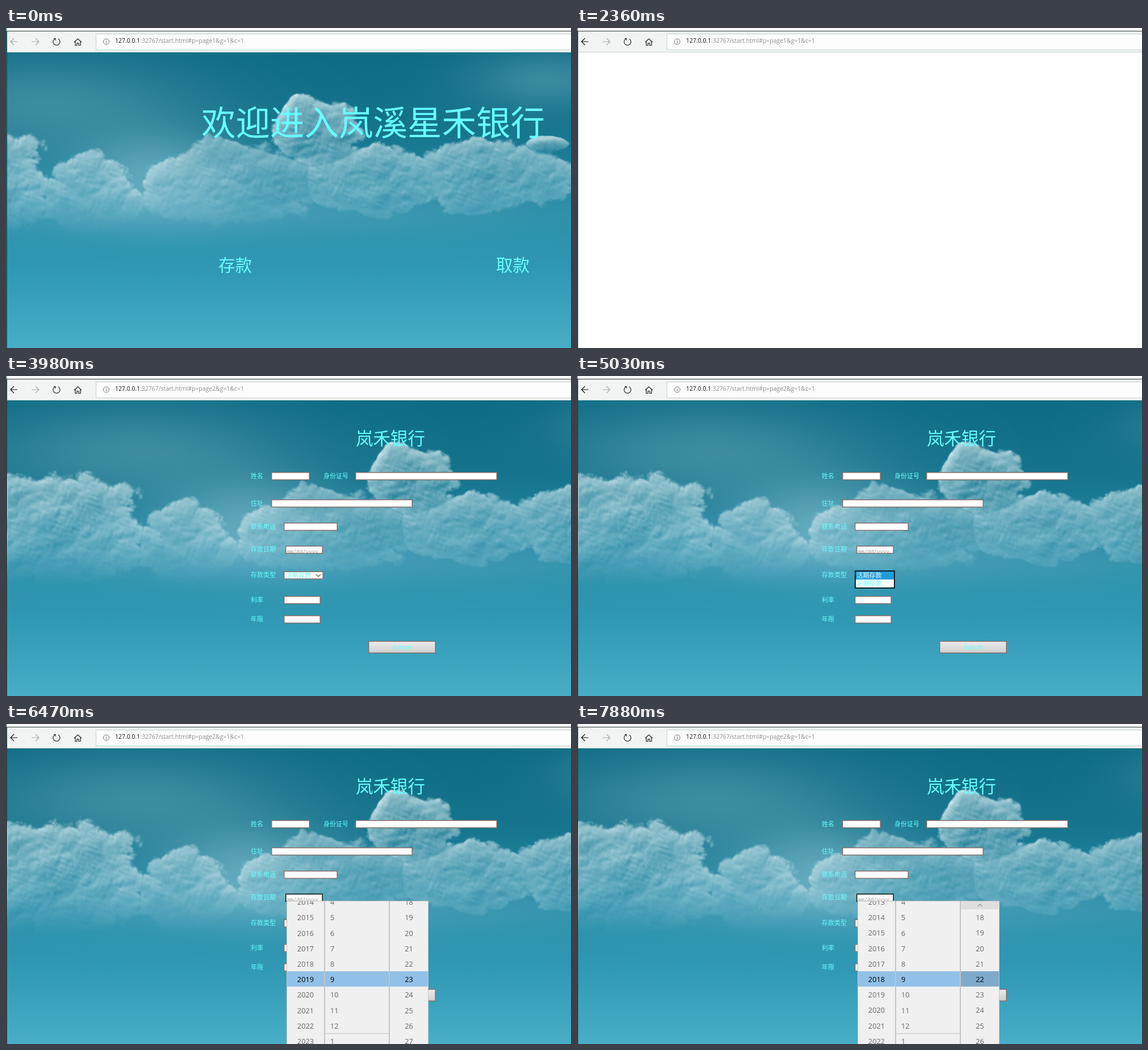
An HTML page with a canvas that plays this animation: 995x563 px, repeating every 8000 ms.

```html
<!DOCTYPE html>
<html lang="zh-CN">
<head>
<meta charset="utf-8">
<title>Bank prototype</title>
<style>
  html, body { margin: 0; width: 100%; height: 100%; overflow: hidden; background: #fff; }
  #stage { position: relative; width: 995px; height: 563px; overflow: hidden; background: #fefefe; }
  #sky { position: absolute; top: 0; }
  #ui { position: absolute; left: 0; top: 0; }
  text { white-space: pre; }
  .cjk { font-family: "Noto Sans CJK SC", "Noto Sans CJK", sans-serif; font-weight: 300; fill: #6ff; }
  .label { font-size: 11px; font-weight: 500; }
  .latin { font-family: "Open Sans", "Noto Sans", sans-serif; }
  .icon { fill: none; stroke: #222; stroke-width: 1.2; }
  .field { fill: #fff; stroke: #806e6a; stroke-width: 1.5; }
</style>
</head>
<body>
<div id="stage">
  <canvas id="sky" width="1162" height="563"></canvas>
  <svg id="ui" width="995" height="563">
    <defs>
      <linearGradient id="buttonFill" x2="0" y2="1">
        <stop stop-color="#ececec"/><stop offset="1" stop-color="#cfcfcf"/>
      </linearGradient>
    </defs>

    <g id="chrome">
      <rect width="995" height="43" fill="#fdfefd"/>
      <rect y="6" width="995" height="36" fill="#f1f4f3"/>
      <rect y="5" width="995" height="1" fill="#2d3b37"/>
      <rect y="42" width="995" height="1" fill="#c4d0cc"/>
      <rect x="158.5" y="10.5" width="850" height="28" fill="#fcfdfc" stroke="#c5d3cc"/>
      <path id="back" class="icon" d="M20 24H8M14 18l-6 6 6 6"/>
      <path class="icon" style="stroke:#a5a9a8" d="M45 24h13M52 18l6 6-6 6"/>
      <path class="icon" d="M86 19a6 6 0 1 0 6 0M84 18.5h3v3.5"/>
      <path class="icon" d="M120 25l6.5-6 6.5 6M122 23.5V30.5h3v-4h3v4h3.200V23.5"/>
      <g class="icon" style="stroke:#777;stroke-width:1">
        <circle cx="176.5" cy="24" r="5"/><path d="M176.5 23v4M176.5 21v1"/>
      </g>
      <text class="latin" x="192" y="26" font-size="10.45" fill="#111">127.0.0.1<tspan id="path" fill="#8c8c8c"></tspan></text>
    </g>

    <g id="welcome" class="cjk">
      <text x="344" y="189" font-size="60.5">欢迎进入岚溪星禾银行</text>
      <text x="374" y="428" font-size="29.5">存款</text>
      <text x="863" y="428" font-size="29.5">取款</text>
    </g>

    <g id="form">
      <text class="cjk" x="616" y="121" font-size="30.5">岚禾银行</text>
      <g id="fields"></g>
      <svg x="493" y="299" width="64" height="13">
        <text x="2" y="12.5" font-size="9.2" font-family="Liberation Mono, monospace" fill="#9a968c">mm/dd/yyyy</text>
      </svg>
      <text class="cjk label" x="493" y="355">活期存款</text>
      <path class="icon" style="stroke:#555" d="M546 349l4 4 4-4"/>
      <rect id="submit" class="field" x="638.75" y="466.75" width="117.5" height="20.5" style="fill:url(#buttonFill)"/>
      <text x="697.5" y="481" text-anchor="middle" font-size="11" font-family="Liberation Sans, sans-serif" fill="#6ff">Submit</text>

      <svg id="list" x="489" y="342" width="71" height="32">
        <rect width="71" height="32" fill="#fff"/>
        <rect width="71" height="16" fill="#1f9cd8"/>
        <text class="cjk label" x="3.5" y="12.5" style="fill:#fff">活期存款</text>
        <text class="cjk label" x="3.5" y="26.5">定期存款</text>
        <rect width="100%" height="100%" fill="none" stroke="#0c2029" stroke-width="4"/>
      </svg>

      <g id="picker"></g>
    </g>

    <rect id="edge" width="1" height="563"/>
    <rect x="1" y="5" width="1" height="558" fill="#2b3f42"/>
  </svg>
</div>

<script>
const LOOP = 8000, PAGE_SHIFT = 167, ROW = 27.2;
const $ = id => document.getElementById(id);
const clamp = x => Math.min(1, Math.max(0, x));
const smooth = (a, b, x) => (x = clamp((x - a) / (b - a))) * x * (3 - 2 * x);

// ---------- Sky: billowing noise shaped by a few ellipses ----------
function paintSky() {
  const canvas = $('sky'), ctx = canvas.getContext('2d');
  const { width: W, height: H } = canvas;
  const GRID = 256;
  let seed = 77;
  const lattice = Float32Array.from({ length: GRID * GRID },
    () => (seed = seed * 16807 % 2147483647) / 2147483647);

  function noise(x, y) {
    const ix = Math.floor(x), iy = Math.floor(y);
    const u = smooth(0, 1, x - ix), v = smooth(0, 1, y - iy);
    const at = (i, j) => lattice[(j & 255) * GRID + (i & 255)];
    const upper = at(ix, iy) * (1 - u) + at(ix + 1, iy) * u;
    const lower = at(ix, iy + 1) * (1 - u) + at(ix + 1, iy + 1) * u;
    return upper * (1 - v) + lower * v;
  }

  function billow(x, y) {
    let sum = 0, weight = .5;
    x /= 75; y /= 65;
    for (let octave = 0; octave < 5; octave++, weight *= .55) {
      sum += weight * Math.abs(2 * noise(x, y) - 1);
      [x, y] = [1.6 * x + 1.2 * y + 7, 1.6 * y - 1.2 * x + 3];
    }
    return sum;
  }

  // Centre, radii and strength
  const clouds = [
    [85, 270, 165, 105, 1], [318, 292, 88, 78, .8], [570, 275, 170, 80, .7], [714, 185, 84, 66, 1.05],
    [815, 270, 155, 62, .9], [1020, 258, 155, 68, .9], [1118, 204, 42, 17, .8]
  ];
  const hazes = [[230, 130, 260, 80, .2], [1120, 90, 130, 50, .2], [430, 255, 150, 75, .3], [560, 320, 560, 50, .14]];

  const field = new Float32Array(W * H), tone = new Float32Array(W * H);
  for (let y = 0, p = 0; y < H; y++) for (let x = 0; x < W; x++, p++) {
    let best = -9;
    for (const [cx, cy, rx, ry, strength] of clouds) {
      const inside = 1 - ((x - cx) / rx) ** 2 - ((y - cy) / ry) ** 2;
      if (inside > best) { best = inside; tone[p] = strength; }
    }
    field[p] = best > -1 ? best + 1.1 * (billow(x, y) - .36) : -1;
  }

  const base = ctx.createLinearGradient(0, 43, 0, H);
  ['#0d6c85', '#15748c', '#2589a5', '#3099b5', '#48aec8'].forEach((c, i) => base.addColorStop(i / 4, c));
  ctx.fillStyle = base;
  ctx.fillRect(0, 0, W, H);

  const image = ctx.getImageData(0, 0, W, H), lit = [226, 243, 247];
  for (let p = W * 10; p < W * H; p++) {
    const x = p % W, y = Math.floor(p / W), f = field[p];
    let haze = 0;
    for (const [cx, cy, rx, ry, strength] of hazes)
      haze += strength * Math.exp(-(((x - cx) / rx) ** 2) - ((y - cy) / ry) ** 2);
    const relief = f - field[p - 6 * W - 3];
    const shade = .3 + .3 * Math.exp(-2.5 * Math.max(0, f)) + .9 * relief;
    const cover = smooth(0, .22, f) * smooth(375, 265, y) * tone[p];
    const mix = clamp(haze * (1 - cover * .5) + cover * Math.min(.9, Math.max(.1, shade)));
    for (let c = 0; c < 3; c++) image.data[p * 4 + c] += (lit[c] - image.data[p * 4 + c]) * mix;
  }
  ctx.putImageData(image, 0, 0);
}
paintSky();

// ---------- Form ----------
function field(label, y, boxX, width, { labelX = 431, id = '' } = {}) {
  $('fields').innerHTML += `<text class="cjk label" x="${labelX}" y="${y + 3.5}">${label}</text>
    <rect class="field" id="${id}" x="${boxX + .75}" y="${y - 6.25}" width="${width - 1.5}" height="12.8"/>`;
}
field('姓名', 176, 467, 68);
field('身份证号', 176, 615, 250, { labelX: 559 });
field('住址', 224, 467, 249);
field('联系电话', 265, 489, 95);
field('存款日期', 305.5, 492, 66, { id: 'date' });
field('存款类型', 350.5, 489, 70, { id: 'select' });
field('利率', 394, 489, 65);
field('年限', 428, 489, 65);

// ---------- Date picker ----------
function column(id, x, width, textX, anchor, valueAt) {
  const middle = 137.5, c = width / 2;
  let rows = '';
  for (let i = -6; i <= 5; i++)
    rows += `<text data-row="${i}" x="${textX}" y="${middle + ROW * i + 4.6}" text-anchor="${anchor}">${valueAt(i)}</text>`;
  if (id === 'month') rows += `<path d="M0 ${middle + ROW * 3.5}H${width}" stroke="#c2c2c2"/>`;
  return `<svg id="${id}" x="${x}" y="312" width="${width}" height="251">
    <rect width="100%" height="100%" fill="#f0f0f0"/>
    <rect y="123" width="100%" height="27" fill="#92c1e8"/>
    <g class="hover"><rect y="123" width="100%" height="27" opacity=".12"/></g>
    <g class="rows latin" font-size="12.8">${rows}</g>
    <g class="hover"><rect width="100%" height="14" fill="#dedede"/>
      <path class="icon" style="stroke:#666;stroke-width:1" d="M${c - 4} 9l4-4 4 4"/></g>
  </svg>`;
}

$('picker').innerHTML = '<rect x="494" y="311" width="250" height="260" fill="#bfbfbf"/>' +
  column('year', 495, 65.5, 32.5, 'middle', i => 2019 + i) +
  column('month', 562, 112.5, 9, 'start', i => (8 + i) % 12 + 1) +
  column('day', 676, 67.5, 33.5, 'middle', i => 23 + i);

function setColumn(id, hover, scroll) {
  const col = $(id);
  col.querySelectorAll('.hover').forEach(g => g.style.opacity = hover);
  col.querySelector('.rows').setAttribute('transform', `translate(0 ${ROW * scroll})`);
  col.querySelectorAll('[data-row]').forEach(row =>
    row.setAttribute('fill', +row.dataset.row === -Math.round(scroll) ? '#000' : '#666'));
}

// ---------- Timeline ----------
function render() {
  const t = performance.now() % LOOP;
  const within = (a, b) => t >= a && t < b;
  const progress = (a, b) => clamp((t - a) / (b - a));
  const ease = (a, b) => 1 - (1 - progress(a, b)) ** 3;
  const show = (id, on) => $(id).style.display = on ? '' : 'none';
  const border = (id, color) => $(id).style.stroke = color;

  const first = t < 2360, second = t >= 2510;
  show('sky', first || second);
  show('welcome', first);
  show('form', second);
  $('sky').style.left = (first ? -PAGE_SHIFT : 0) + 'px';
  $('back').style.stroke = first ? '#a0a5a4' : '#111';
  $('path').textContent = `:32767/start.html#p=page${t < 2450 ? 1 : 2}&g=1&c=1`;
  $('edge').setAttribute('fill', t < 500 ? '#1b6c80' : '#33474d');

  border('submit', within(2960, 3980) ? '#454040' : '#806e6a');
  border('select', within(4130, 4310) || within(4550, 5780) ? '#222' : '#806e6a');
  border('date', t >= 5870 ? '#111' : t >= 5210 ? '#4a4543' : '#806e6a');

  show('list', within(4550, 5210));
  $('list').setAttribute('height', 16 + 16 * (ease(4550, 4820) - ease(5060, 5210)));

  show('picker', t >= 6200);
  $('picker').style.opacity = t < 6290 ? .5 : t < 6470 ? .92 : 1;
  setColumn('year', t < 7500 ? progress(6820, 6890) : 0, ease(7130, 7430));
  setColumn('month', within(7520, 7670) ? 1 : 0, 0);
  setColumn('day', t >= 7670 ? 1 : 0, ease(7690, 7880));
  requestAnimationFrame(render);
}
render();
</script>
</body>
</html>
```
